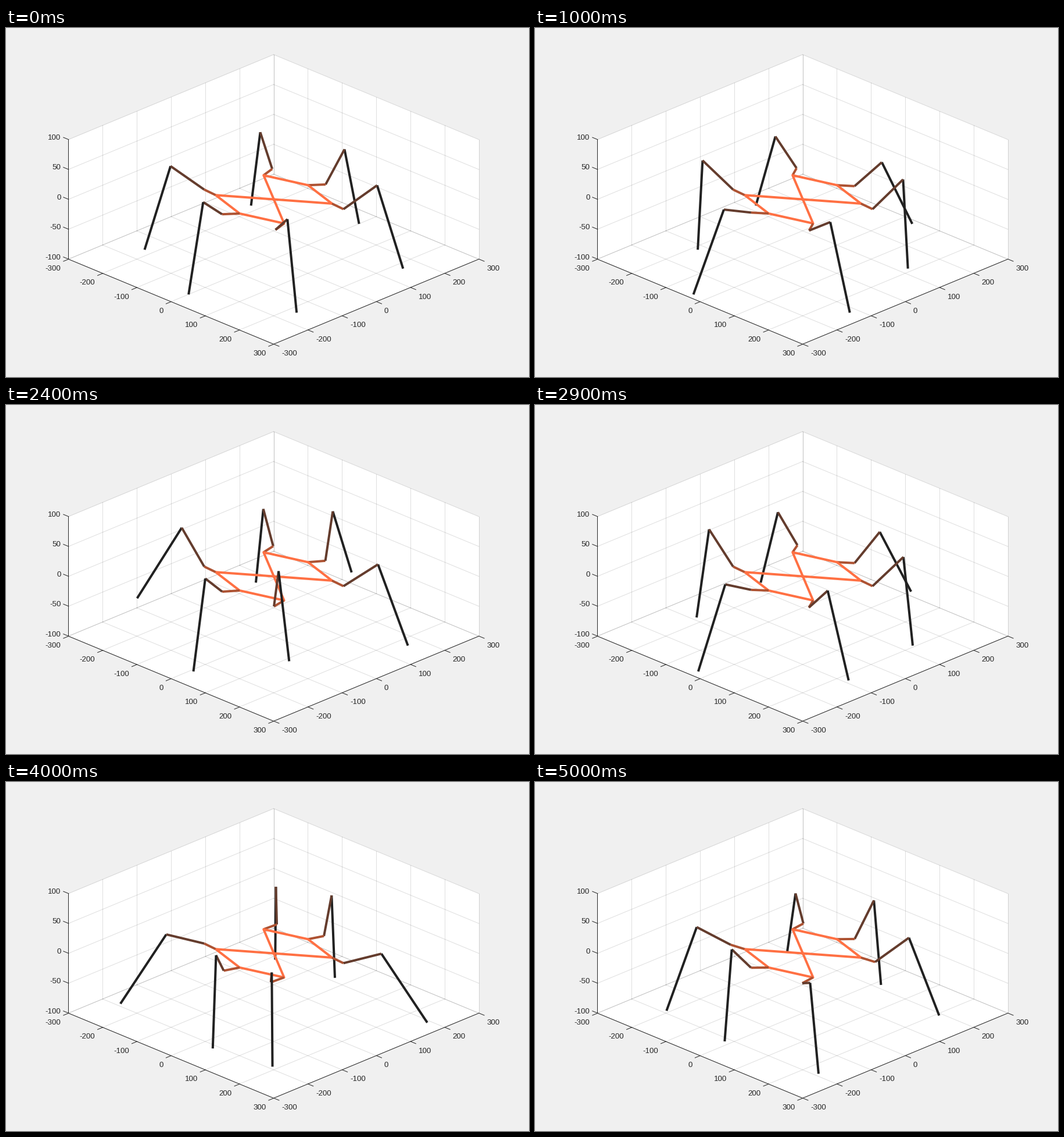
A matplotlib script for the animation above (5100 ms loop, 900 px wide and 600 px high).

```python
import numpy as np
import matplotlib.pyplot as plt
from matplotlib.animation import FuncAnimation

PX = 0.72  # points per pixel at 100 dpi
plt.rcParams["font.family"] = "Liberation Sans"

# Leg geometry
RADIAL, LATERAL = 23.4, 28.0
FEMUR, TIBIA = 80.0, 149.5
REACH, GROUND = 149.3, -100.0
PIVOTS = np.array([(100, 70), (0, 100), (-100, 70),
                   (-100, -70), (0, -100), (100, -70)], float)
BODY_ORDER = [3, 0, 1, 2, 5, 4, 3]

BODY, COXA, THIGH, SHIN = "#ff7043", "#ad5232", "#643c2d", "#212121"
INK = "#262626"
SNAP = 0.35  # makes the upright box lines round down to whole pixels

# Gait: foot offsets of the odd legs after each step; even legs mirror them
STEP_FRAMES = 10
HALF = np.array([1, 1]) * 50 / np.sqrt(2)
WAY = [0 * HALF, HALF, -HALF, HALF, -HALF, np.array([50, 0]) - HALF]


def project(u, v, z):
    x = 460.9 + 0.5885 * (u + v)
    y = 294.6 + 0.2435 * (u - v) - 1.028 * z
    return x, y


def depth(points):
    u, v, z = np.mean(points, axis=0)
    return 0.536 * (u - v) + 0.468 * z


def foot_offset(leg, n):
    step = min(n // STEP_FRAMES, len(WAY) - 2)
    t = n / STEP_FRAMES - step
    sign = 1 if leg % 2 else -1
    start, move = sign * WAY[step], sign * (WAY[step + 1] - WAY[step])
    swinging = (leg + step) % 2 == 1
    if not swinging:
        return start + move * t, 0.0
    lift = np.hypot(*move) / 2 * np.sin(np.pi * t)
    return start + move * (1 - np.cos(np.pi * t)) / 2, lift


def leg_points(leg, n):
    pivot = PIVOTS[leg]
    shift, lift = foot_offset(leg, n)
    rel = pivot / np.hypot(*pivot) * REACH + shift
    z = GROUND + lift
    r = np.hypot(*rel)
    heading = np.arctan2(rel[1], rel[0]) + np.arcsin(LATERAL / r)
    ahead = np.array([np.cos(heading), np.sin(heading)])
    side = np.array([ahead[1], -ahead[0]])
    hip = pivot + RADIAL * ahead + LATERAL * side

    # Two-link inverse kinematics in the vertical plane of the leg
    out = np.sqrt(r**2 - LATERAL**2) - RADIAL
    dist = np.hypot(out, z)
    bend = np.arccos((FEMUR**2 + dist**2 - TIBIA**2) / (2 * FEMUR * dist))
    rise = np.arctan2(z, out) + bend
    knee = hip + FEMUR * np.cos(rise) * ahead
    return np.array([(*pivot, 0), (*hip, 0),
                     (*knee, FEMUR * np.sin(rise)), (*(pivot + rel), z)])


fig = plt.figure(figsize=(9, 6), dpi=100, facecolor="#f0f0f0")
ax = fig.add_axes([0, 0, 1, 1])
ax.set_xlim(0, 900)
ax.set_ylim(600, 0)
ax.axis("off")


def box_line(*points, **style):
    x, y = project(*np.array(points, float).T)
    ax.plot(x - SNAP, y, color=INK, lw=PX, **style)


def grid_line(*points):
    box_line(*points, alpha=0.15, zorder=-900)


def axis_line(*points):
    box_line(*points, zorder=-800)


def tick(point, dx, dy, text_dx, text_dy, value):
    x, y = project(*point)
    ax.plot([x, x + dx], [y, y + dy], color=INK, lw=PX, zorder=-800)
    ax.text(x + text_dx, y + text_dy + 4.6, str(value), color=INK,
            fontsize=13.33 * PX, ha="left" if text_dx > 0 else "right",
            va="baseline", zorder=-800)


def draw_box():
    lo, hi, bottom, top = -300, 300, -100, 100
    planes = [
        [(lo, lo, bottom), (hi, lo, bottom), (hi, hi, bottom), (lo, hi, bottom)],
        [(lo, lo, bottom), (lo, hi, bottom), (lo, hi, top), (lo, lo, top)],
        [(lo, hi, bottom), (hi, hi, bottom), (hi, hi, top), (lo, hi, top)],
    ]
    for plane in planes:
        x, y = project(*np.array(plane, float).T)
        ax.fill(x, y, color="white", lw=0, zorder=-1000)

    for a in range(lo, hi + 1, 100):
        grid_line((a, lo, bottom), (a, hi, bottom))
        grid_line((lo, a, bottom), (hi, a, bottom))
        grid_line((lo, a, bottom), (lo, a, top))
        grid_line((a, hi, bottom), (a, hi, top))
        tick((a, lo, bottom), -9, 3.7, -13.4, 15, a)
        tick((hi, a, bottom), 9, 3.7, 13.4, 15, a)
    for z in range(bottom, top + 1, 50):
        grid_line((lo, lo, z), (lo, hi, z))
        grid_line((lo, hi, z), (hi, hi, z))
        tick((lo, lo, z), -9, -3.7, -13.4, -4.4, z)

    axis_line((lo, lo, top), (lo, lo, bottom))
    axis_line((lo, lo, bottom), (hi, lo, bottom))
    axis_line((hi, lo, bottom), (hi, hi, bottom))


draw_box()
body = np.array([(*PIVOTS[i], 0) for i in BODY_ORDER])
ax.plot(*project(*body.T), color=BODY, lw=4 * PX, solid_joinstyle="round",
        solid_capstyle="butt", zorder=0)
legs = [[ax.plot([], [], color=c, lw=4 * PX, solid_capstyle="butt",
                 snap=False)[0]
         for c in (COXA, THIGH, SHIN)] for _ in PIVOTS]


def update(n):
    for leg, parts in enumerate(legs):
        points = leg_points(leg, n)
        for k, part in enumerate(parts):
            ends = points[k:k + 2]
            part.set_data(*project(*ends.T))
            part.set_zorder(depth(ends))
    return [part for parts in legs for part in parts]


anim = FuncAnimation(fig, update, frames=51, interval=100, repeat=True)
plt.show()
```
